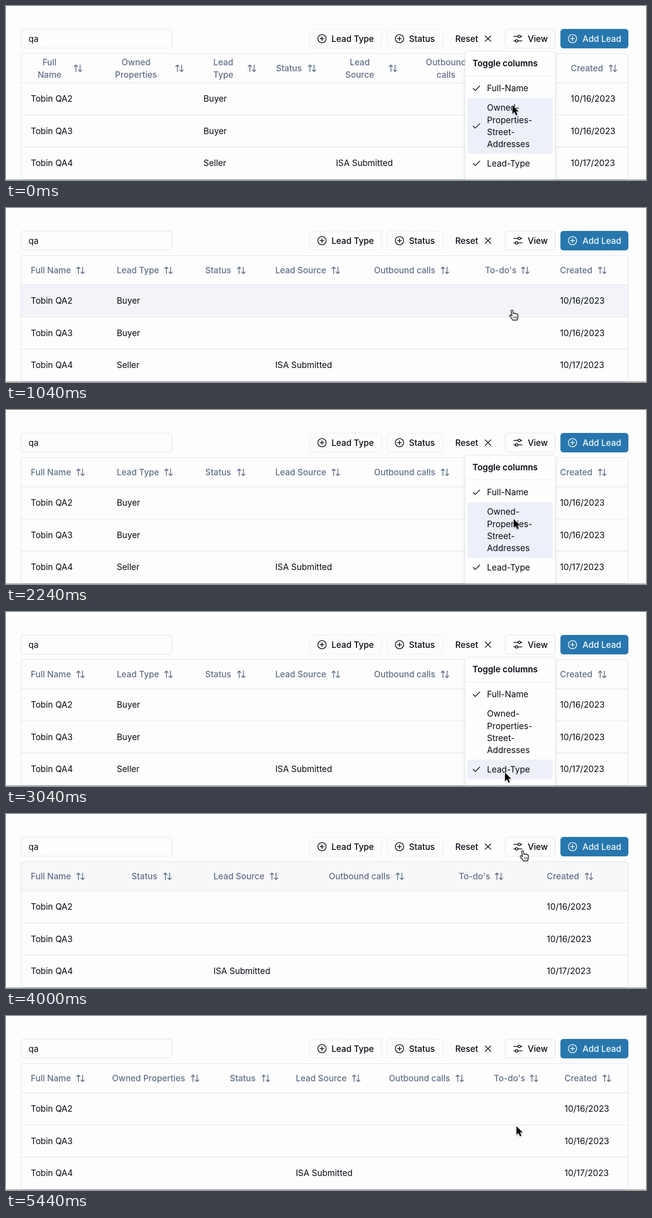
Write an HTML page that moves like this. It is 1280 px wide and 349 px high and loops after 5.52 s.

```html
<!DOCTYPE html>
<html lang="en">
<head>
<meta charset="utf-8">
<title>Leads table</title>
<style>
html, body { margin: 0; width: 100%; height: 100%; overflow: hidden; background: #fdfdfd; }
svg { display: block; font: 400 17px Inter, sans-serif; fill: #060a14; }
text { white-space: pre; }
.medium { font-weight: 500; }
.title { font-weight: 600; }
.head { font-weight: 500; fill: #5f6f88; }
.center { text-anchor: middle; }
.icon { fill: none; stroke: #060a14; stroke-width: 1.5; stroke-linecap: round; stroke-linejoin: round; }
.sort { stroke: #5f6f88; stroke-width: 1.9; }
.box { fill: none; stroke: #dfe3ec; stroke-width: 1.2; }
.dash { stroke-dasharray: 4 3; }
.hover { fill: #f3f4f9; }
.active { fill: #edf0f8; }
#menu { transform-origin: 1008px 430px; }
#panel { fill: #fefefe; stroke: #e0e4ec; filter: drop-shadow(0 4px 4px rgba(20, 30, 60, .1)); }
#pointer { filter: drop-shadow(0 1px 1px rgba(0, 0, 0, .3)); }
</style>
</head>
<body>
<svg width="1280" height="349" viewBox="0 0 1280 349">
  <defs>
    <g id="plus"><circle r="8.3"/><path d="M-4 0H4M0-4V4"/></g>
    <path id="check" d="M6.5-4.5-2.4 4.5-6.5.4"/>
    <path id="sort" d="m21 16-4 4-4-4M17 20V4M3 8l4-4 4 4M7 4v16" transform="scale(.84) translate(-12 -12)"/>
  </defs>

  <rect class="box" x="29.8" y="46.5" width="302.5" height="38" rx="6"/>
  <text x="45" y="71.6">qa</text>

  <g class="medium">
    <rect class="box dash" x="607" y="46.5" width="144" height="38" rx="6"/>
    <text x="651" y="71.6">Lead Type</text>
    <rect class="box dash" x="762" y="46.5" width="112" height="38" rx="6"/>
    <text x="806" y="71.6">Status</text>
    <text x="898.5" y="71.6">Reset</text>
    <rect class="box" x="998.5" y="46.5" width="100" height="38" rx="6"/>
    <rect class="active" id="viewHover" x="999" y="47" width="99" height="37" rx="5.5"/>
    <text x="1043.5" y="71.6">View</text>
    <rect x="1108.8" y="46" width="136" height="39" rx="6" fill="#2777ae"/>
    <text x="1153" y="71.6" fill="#f8fafc">Add Lead</text>
  </g>
  <g class="icon">
    <use href="#plus" x="632" y="65.5"/>
    <use href="#plus" x="787" y="65.5"/>
    <use href="#plus" x="1133" y="65.5" stroke="#f8fafc"/>
    <path d="m958.5 60 11 11m0-11-11 11"/>
    <path d="M1015.5 61h8.5m5 0h3M1015.5 70h3.2m5 0h8.3"/>
    <circle cx="1026.5" cy="61" r="2.4"/>
    <circle cx="1021.2" cy="70" r="2.4"/>
  </g>

  <rect class="hover" id="headHover" x="30" y="96" width="1214" height="58" opacity="0"/>
  <rect class="hover" id="row1" x="30" y="154" width="1214" height="64"/>
  <rect class="hover" id="row2" x="30" y="218" width="1214" height="64"/>
  <rect class="hover" id="row3" x="30" y="283" width="1214" height="64"/>
  <rect class="box" x="29.8" y="95.5" width="1214.7" height="252" rx="6"/>
  <path class="box" d="M30 154.2H1244M30 218.5H1244M30 282.8H1244"/>
  <g id="tables"></g>

  <g id="menu">
    <rect id="panel" x="918" y="90.8" width="180.5" height="594" rx="6"/>
    <text class="title" x="933" y="121.4">Toggle columns</text>
    <path d="M919 140.2h179" stroke="#eceff4" stroke-width="1.2"/>
    <rect class="active" id="hitName" x="923" y="146" width="170" height="39" rx="4"/>
    <rect class="active" id="hitOwned" x="923" y="185" width="170" height="111.5" rx="4"/>
    <rect class="active" id="hitType" x="923" y="296" width="170" height="39.5" rx="4"/>
    <g id="items"></g>
    <g class="icon">
      <use href="#check" x="941" y="165"/>
      <use href="#check" id="tickOwned" x="941" y="240.5"/>
      <use href="#check" id="tickType" x="941" y="315.5"/>
    </g>
  </g>

  <path d="M0 348.5H1280" stroke="#8b8b8d"/>

  <g id="pointer">
    <path id="arrow" d="M0 0V17.2L4 13.5 7 20.3 9.8 19 6.9 12.5H12.3Z" fill="#000" stroke="#fff" stroke-width="1.3" paint-order="stroke"/>
    <g id="hand" fill="#fff" stroke="#111" stroke-width="1.4" stroke-linejoin="round">
      <path d="M-1.8 1.5c0-2.4 3.4-2.4 3.6 0l.8 5.5c.6-1.6 3-1.4 3.2.2.8-1.2 2.8-.8 3 .6 1-.8 2.8-.2 2.8 1.4v4.6c0 3-1.4 3.6-1.6 5.8h-8.6c-.6-2.4-3.4-4.6-5.6-7.8-1.2-1.8.8-3 2.4-1.8l2 1.6z"/>
      <path d="M3.6 12.5v4M6.2 12.5v4M8.8 12.5v4" stroke-width="1"/>
    </g>
  </g>
</svg>
<script>
const LOOP = 5520;
const byId = id => document.getElementById(id);
const text = (x, y, str, cls = '') => `<text class="${cls}" x="${x}" y="${y}">${str}</text>`;
const sortIcon = x => `<use class="icon sort" href="#sort" x="${x}" y="125"/>`;

// Distance from a one-line label to its sort icon
const iconGap = {
  'Full Name': 99.5, 'Owned Properties': 166, 'Lead Type': 103.5, 'Status': 72,
  'Lead Source': 121, 'Outbound calls': 142, "To-do's": 80.5, 'Created': 84.5
};
const cells = {
  'Full Name': ['Tobin QA2', 'Tobin QA3', 'Tobin QA4'],
  'Lead Type': ['Buyer', 'Buyer', 'Seller'],
  'Lead Source': ['', '', 'ISA Submitted'],
  'Created': ['10/16/2023', '10/16/2023', '10/17/2023']
};

// Column: [label, left, centre and icon x when the label wraps]
function column([label, x, mid, icon]) {
  const head = mid
    ? label.split(' ').map((word, i) => text(mid, 119.2 + i * 24.3, word, 'head center')).join('') + sortIcon(icon)
    : text(x, 131.2, label, 'head') + sortIcon(x + iconGap[label]);
  return head + (cells[label] || []).map((str, i) => text(x, 192.4 + i * 64.3, str)).join('');
}

const tables = {
  all: [['Full Name', 49.5, 87, 144], ['Owned Properties', 204, 260, 347], ['Lead Type', 395, 434.5, 492],
    ['Status', 540], ['Lead Source', 660, 707.5, 774], ['Outbound calls', 839, 880, 943],
    ["To-do's", 985], ['Created', 1129.5]],
  noOwned: [['Full Name', 49.5], ['Lead Type', 221.5], ['Status', 398.5], ['Lead Source', 538.5],
    ['Outbound calls', 736], ["To-do's", 958], ['Created', 1108]],
  noType: [['Full Name', 49.5], ['Status', 251], ['Lead Source', 415], ['Outbound calls', 645.5],
    ["To-do's", 905.5], ['Created', 1081.5]],
  owned: [['Full Name', 49.5], ['Owned Properties', 212], ['Status', 447.5], ['Lead Source', 579.5],
    ['Outbound calls', 765.5], ["To-do's", 975.5], ['Created', 1117]]
};
byId('tables').innerHTML = Object.entries(tables)
  .map(([id, cols]) => `<g id="${id}">${cols.map(column).join('')}</g>`).join('');

byId('items').innerHTML = [['Full-Name', 171.2], ['Owned-', 210.2], ['Properties-', 234.5], ['Street-', 258.8],
  ['Addresses', 283.1], ['Lead-Type', 321.6], ['Motivation', 360.5]].map(([str, y]) => text(962, y, str)).join('');

// Keyframes are written in milliseconds of the loop
const sheet = document.head.appendChild(document.createElement('style'));
function track(id, keys, easing) {
  const rules = keys.map(([ms, css]) => `${(ms / LOOP * 100).toFixed(3)}%{${css}}`).join('');
  sheet.append(`@keyframes ${id}{${rules}}#${id}{animation:${id} ${LOOP}ms ${easing} infinite}\n`);
}
function show(id, ...spans) {
  const keys = [[0, 'opacity:0'], [LOOP, 'opacity:0']];
  for (const [from, to] of spans) {
    if (from === 0) keys.shift();
    keys.push([from, 'opacity:1']);
    if (to < LOOP) keys.push([to, 'opacity:0']);
  }
  track(id, keys.sort((a, b) => a[0] - b[0]), 'step-end');
}

show('all', [0, 320]);
show('noOwned', [320, 3300]);
show('noType', [3300, 5120]);
show('owned', [5120, LOOP]);

show('tickOwned', [0, 240], [5060, LOOP]);
show('tickType', [0, 3240]);
show('hitName', [2058, 2156], [4705, 4795]);
show('hitOwned', [0, 400], [2156, 2435], [4795, 5280]);
show('hitType', [2435, 3480]);

show('row1', [560, 1265], [3730, 3850]);
show('row2', [3600, 3730]);
show('row3', [3480, 3600]);
show('viewHover', [1440, 1800], [4050, 4300]);
show('hand', [600, 1440], [3520, 4050]);
show('arrow', [0, 600], [1440, 3520], [4050, LOOP]);
track('headHover', [[0, 'opacity:0'], [3850, 'opacity:0'], [3950, 'opacity:.5'],
  [4050, 'opacity:.5'], [4150, 'opacity:0'], [LOOP, 'opacity:0']], 'linear');

const open = 'opacity:1;transform:translateY(0px) scale(1)';
const shut = 'opacity:0;transform:translateY(-9.7px) scale(.95)';
track('menu', [[0, open], [240, open], [370, shut], [1645, shut], [1795, open], [3240, open], [3370, shut],
  [4240, shut], [4390, open], [5060, open], [5190, shut], [LOOP, shut]], 'ease');

const at = (ms, x, y) => [ms, `transform:translate(${x}px,${y}px)`];
track('pointer', [at(0, 1013, 199), at(400, 1013, 199), at(640, 1012, 205), at(1120, 1012, 205),
  at(1520, 1041, 67), at(1860, 1041, 67), at(2500, 998, 322), at(3520, 998, 322), at(4000, 1033, 74),
  at(4080, 1041, 72), at(4480, 1041, 73), at(4560, 1039, 83), at(4880, 1022, 222),
  at(5440, 1021, 221), at(LOOP, 1021, 221)], 'linear');
</script>
</body>
</html>
```
